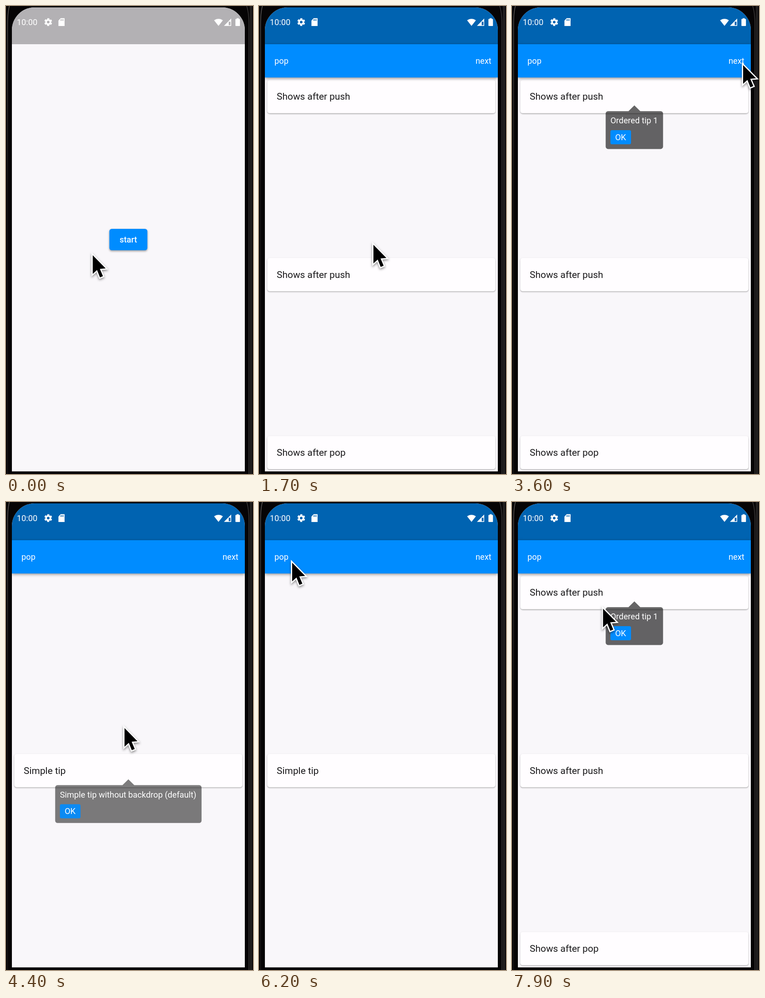
These frames come from a looping animation (544 px wide and 1029 px high, 8 s). An HTML page with a canvas:

```html
<!DOCTYPE html>
<html lang="en">
<head>
<meta charset="utf-8">
<title>Tooltip demo</title>
<style>
  html, body { margin: 0; width: 100%; height: 100%; overflow: hidden; background: #000; }
  canvas { display: block; }
</style>
</head>
<body>
<canvas id="stage" width="544" height="1029"></canvas>
<script>
const ctx = document.getElementById('stage').getContext('2d');
const LOOP = 8000, STEP = 100;

// Layout in density-independent pixels, as on the device.
const DP = 1.306;
const LEFT = 13, TOP = 3, WIDTH = 513, BOTTOM = 1023.5;
const MID = LEFT + WIDTH / 2;
const HEADER = 84, HEADER_H = 56 * DP;
const GAP = 4 * DP, RADIUS = 4 * DP, PAD = 8 * DP;
const SMALL = 14 * DP, LARGE = 16 * DP;
const CARD_TOP = 162.7, CARD_STEP = 391.3;
const BLUE = '#008cff', DARK_BLUE = '#0063b1', PAGE = '#f9f7fa', GREY = '#b3b1b4';

const clamp = v => Math.max(0, Math.min(1, v));
const easeOut = v => 1 - (1 - v) ** 2;
const fade = (t, start) => clamp((t - start + STEP) / 400);
const cardY = row => CARD_TOP + row * CARD_STEP;

function rect(x, y, w, h, color) {
  ctx.fillStyle = color;
  ctx.fillRect(x, y, w, h);
}

function round(x, y, w, h, color, r = RADIUS) {
  ctx.fillStyle = color;
  ctx.beginPath();
  ctx.roundRect(x, y, w, h, r);
  ctx.fill();
}

function outline(points) {
  ctx.beginPath();
  points.forEach(([x, y]) => ctx.lineTo(x, y));
  ctx.closePath();
}

// Text is centred vertically on midY.
function text(str, x, midY, size = SMALL, color = '#fff', weight = 400) {
  ctx.font = `${weight} ${size}px Roboto, sans-serif`;
  ctx.fillStyle = color;
  ctx.fillText(str, x, midY + size * 0.342);
}

function shadowed(alpha, blur, dy, draw) {
  ctx.save();
  ctx.shadowColor = `rgba(0,0,0,${alpha})`;
  ctx.shadowBlur = blur;
  ctx.shadowOffsetY = dy;
  draw();
  ctx.restore();
}

function edgeLine(x, bend, color) {
  ctx.strokeStyle = color;
  ctx.lineWidth = 1.5;
  ctx.beginPath();
  ctx.moveTo(x + bend, 0);
  ctx.quadraticCurveTo(x, 14, x, 42);
  ctx.lineTo(x, 1029);
  ctx.stroke();
}

function bezel() {
  rect(0, 0, 544, 1029, '#060405');
  const shine = ctx.createLinearGradient(0, 0, 0, 420);
  shine.addColorStop(0, '#5c5856');
  shine.addColorStop(1, '#1b1819');
  edgeLine(3.5, 4, shine);
  rect(537, 0, 5, 1029, '#211f1f');
  edgeLine(535, -5, '#3b3939');
}

function gear(x, y) {
  const ring = (r, width, dash) => {
    ctx.lineWidth = width;
    ctx.setLineDash(dash);
    ctx.beginPath();
    ctx.arc(x, y, r, 0, 2 * Math.PI);
    ctx.stroke();
  };
  const pitch = 2 * Math.PI * 7.2 / 6;
  ctx.save();
  ctx.strokeStyle = '#fff';
  ctx.lineDashOffset = 2.2 - pitch / 2;
  ring(4.7, 3.6, []);
  ring(7.2, 2.8, [4.4, pitch - 4.4]);
  ctx.restore();
}

function statusBar(color) {
  rect(LEFT, TOP, WIDTH, HEADER - TOP, color);
  text('10:00', 23.7, 36);
  gear(93, 35.3);

  ctx.fillStyle = '#fff';
  outline([[120.5, 26.8], [129, 26.8], [129, 44], [115.5, 44], [115.5, 32]]);
  ctx.fill();
  for (let i = 0; i < 3; i++) rect(120 + i * 2.7, 29, 1.4, 3.5, color);

  ctx.fillStyle = '#fff';
  ctx.beginPath();
  ctx.moveTo(468, 43.8);
  ctx.arc(468, 43.8, 15.6, -Math.PI / 2 - 0.67, -Math.PI / 2 + 0.67);
  ctx.fill();

  outline([[480, 43.8], [496, 43.8], [496, 27.5]]);
  ctx.fill();
  rect(490.5, 34.5, 4, 7.7, color);

  round(505.3, 28.5, 10, 15.5, '#fff', 1);
  rect(508, 26.8, 4.6, 2, '#fff');
}

function card(label, row) {
  const x = LEFT + GAP, y = cardY(row), h = 56 * DP;
  shadowed(0.34, 2.5, 1.3, () => round(x, y, WIDTH - 2 * GAP, h, '#fffdff'));
  text(label, x + LARGE, y + h / 2, LARGE, '#1a191b');
}

function header() {
  statusBar(DARK_BLUE);
  shadowed(0.5, 7, 2, () => rect(LEFT, HEADER, WIDTH, HEADER_H, BLUE));
  text('pop', 34, 121);
  text('next', 476.9, 121);
}

function tooltip(label, row, width, shade, buttonAlpha, alpha) {
  if (alpha <= 0) return;
  const y = cardY(row) + 55.7, x = MID - width / 2, top = y + 12.8;
  ctx.save();
  ctx.globalAlpha = alpha;
  ctx.beginPath();
  ctx.roundRect(x, top, width, 83.2, RADIUS);
  ctx.moveTo(MID - 13, top);
  ctx.lineTo(MID, y);
  ctx.lineTo(MID + 13, top);
  ctx.closePath();
  ctx.fillStyle = `rgba(0,0,0,${shade})`;
  ctx.fill();
  text(label, x + PAD, top + 20.9);
  ctx.globalAlpha = alpha * buttonAlpha;
  round(x + PAD, top + 41.9, 45.4, 31, BLUE, 3.5);
  ctx.globalAlpha = alpha;
  text('OK', x + 2 * PAD, top + 57.4);
  ctx.restore();
}

function startPage(t) {
  statusBar(GREY);
  const pressed = t >= 1100, w = 64 * DP, h = 36 * DP;
  shadowed(0.4, pressed ? 6 : 4, pressed ? 3 : 2,
    () => round(MID - w / 2, 490, w, h, pressed ? '#1f9aff' : BLUE));
  text('start', 250.3, 490 + h / 2, SMALL, '#fff', 500);
}

function listPage(tipAlpha) {
  ['push', 'push', 'pop'].forEach((event, row) => card('Shows after ' + event, row));
  header();
  tooltip('Ordered tip 1', 0, 126.4, 0.6, 1, tipAlpha);
}

function simplePage(t) {
  card('Simple tip', 1);
  header();
  tooltip('Simple tip without backdrop (default)', 1, 322.4, 0.51, 0.9,
    fade(t, 4000) - fade(t, 5500));
}

// The hand goes from the button to "next", down to OK, up to "pop" and back to the first tip.
function pointerAt(t) {
  let x = 191, y = 548;
  const glide = (start, end, toX, toY) => {
    const k = easeOut(clamp((t - start) / (end - start)));
    x += (toX - x) * k;
    y += (toY - y) * k;
  };
  glide(100, 700, 267, 521);
  glide(1600, 1700, 252, 525);
  glide(2300, 3300, 509, 130);
  glide(3900, 4400, 261, 497);
  glide(4400, 5200, 155, 695);
  glide(5500, 6200, 73, 133.5);
  glide(7300, 7900, 200.5, 234.5);
  return [x, y];
}

function pointer(x, y) {
  ctx.save();
  ctx.translate(x, y);
  outline([[0, 0], [0, 41], [9.5, 32.5], [16, 48.7], [22.5, 46], [15.7, 30], [28.5, 29]]);
  ctx.lineWidth = 5.4;
  ctx.strokeStyle = '#fff';
  shadowed(0.45, 5, 2.5, () => ctx.stroke());
  ctx.fillStyle = '#000';
  ctx.fill();
  ctx.restore();
}

function draw(t) {
  bezel();
  ctx.save();
  ctx.beginPath();
  ctx.roundRect(LEFT, TOP, WIDTH, BOTTOM - TOP, [50, 50, 0, 0]);
  ctx.clip();
  rect(LEFT, TOP, WIDTH, BOTTOM - TOP, PAGE);
  if (t < 1700) startPage(t);
  else if (t < 3800) listPage(fade(t, 1900));
  else if (t < 7200) simplePage(t);
  else listPage(fade(t, 7400));
  ctx.restore();
  pointer(...pointerAt(t));
}

const begin = performance.now();
function tick() {
  const t = (performance.now() - begin) % LOOP;
  draw(Math.floor(t / STEP) * STEP);
  requestAnimationFrame(tick);
}
tick();
</script>
</body>
</html>
```
